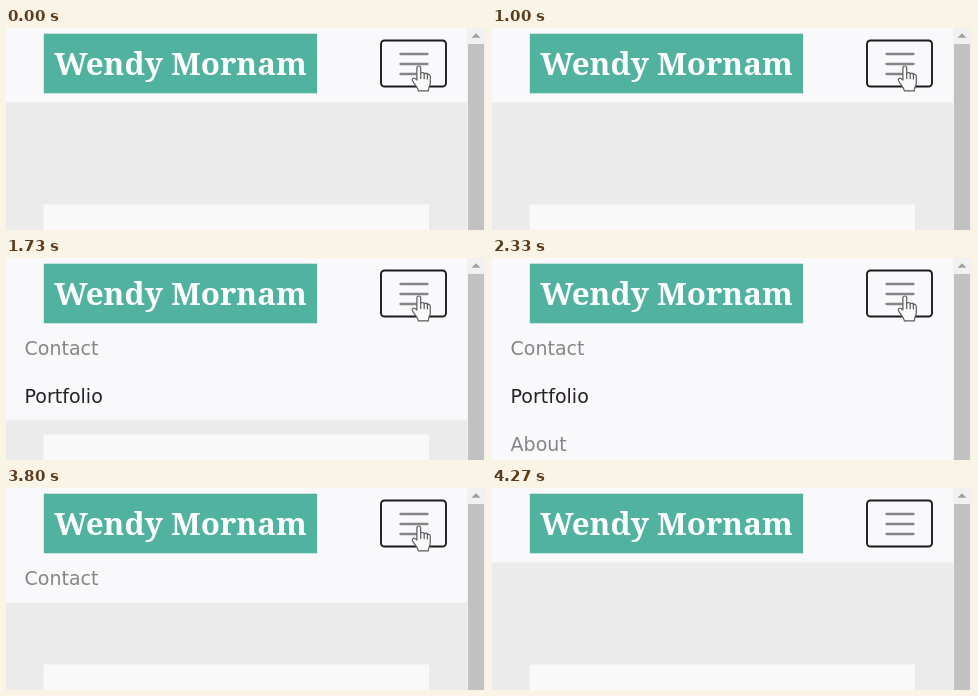
An HTML page that plays this animation: 480x202 px, repeating every 4.34 s.

```html
<!DOCTYPE html>
<html lang="en">
<head>
<meta charset="utf-8">
<title>Collapsing navbar</title>
<style>
  html, body { margin: 0; width: 100%; height: 100%; overflow: hidden; background: #ebebeb; }
  svg { display: block; width: 100vw; height: 100vh; }
  .brand { font: bold 31.3px "Noto Serif", serif; fill: #fbfdfd; text-anchor: middle; }
  .links { font: 19px "DejaVu Sans", sans-serif; fill: #86868a; }
  .links .active { fill: #252324; }
</style>
</head>
<body>
<svg viewBox="0 0 480 202" preserveAspectRatio="none">
  <defs>
    <clipPath id="menuClip"><rect id="menuArea" x="0" y="66" width="461" height="0"/></clipPath>
  </defs>

  <rect width="480" height="202" fill="#ebebeb"/>
  <rect x="37.5" y="176.5" width="385.5" height="26" fill="#f9f9fa"/>

  <rect id="bar" width="461" height="74.5" fill="#f9f9fb"/>
  <rect x="37.8" y="5.7" width="273.3" height="59.6" fill="#52b2a0"/>
  <text class="brand" x="174.5" y="47">Wendy Mornam</text>

  <g class="links" clip-path="url(#menuClip)">
    <text x="18.6" y="97">Contact</text>
    <text x="18.6" y="145" class="active">Portfolio</text>
    <text x="18.6" y="192.6">About</text>
  </g>

  <rect x="375" y="12.5" width="65" height="46" rx="3.5" fill="none" stroke="#1b1b20" stroke-width="1.9"/>
  <path d="M394.5 26H421.5M394.5 36H421.5M394.5 46H421.5" stroke="#858588" stroke-width="2.3" stroke-linecap="round"/>

  <!-- Scrollbar -->
  <rect x="461" width="19" height="202" fill="#f1f1f1"/>
  <rect x="462" y="16" width="16" height="186" fill="#c1c1c1"/>
  <path d="M465.5 9.8L470 5.2L474.5 9.8Z" fill="#a0a0a0"/>

  <!-- Hand pointer -->
  <g id="hand" transform="translate(1.6 .4)" stroke="#5c5c60" stroke-width="1.2" stroke-linejoin="round" stroke-linecap="round">
    <path fill="#fafafb" d="M409.3 51.5V39.6C409.3 36.9 413.1 36.9 413.1 39.6V45.2
      C413.6 43.6 416.4 43.8 416.6 45.6C417.4 44.4 419.6 44.7 419.8 46.4
      C420.8 45.5 422.7 46 422.7 48V54C422.7 57 421 58.2 420.7 62.5H410.8
      C410.5 59.4 407 56.4 404.9 52.3C404 50.2 406.2 49.1 407.6 50.2Z"/>
    <path fill="none" d="M413.1 45.2V50M416.6 45.6V50.3M419.8 46.4V50.6"/>
  </g>
</svg>

<script>
  const LOOP = 4340, FRAME = 1000 / 15;
  const OPEN_AT = 1610, CLOSE_AT = 3650, SLIDE = 350;
  const BAR = 74.5, MENU = 144;
  const HAND_GONE = 4190;
  const byId = id => document.getElementById(id);
  const bar = byId("bar"), menuArea = byId("menuArea"), hand = byId("hand");

  const bezier = (a, b, s) => 3 * a * s * (1 - s) ** 2 + 3 * b * s * s * (1 - s) + s ** 3;

  // CSS "ease": cubic-bezier(.25, .1, .25, 1)
  function ease(x) {
    if (x <= 0) return 0;
    if (x >= 1) return 1;
    let lo = 0, hi = 1;
    for (let i = 0; i < 24; i++) {
      const mid = (lo + hi) / 2;
      if (bezier(.25, .25, mid) < x) lo = mid; else hi = mid;
    }
    return bezier(.1, 1, lo);
  }

  function draw(time) {
    const t = Math.floor((time % LOOP + 5) / FRAME) * FRAME;
    const open = ease((t - OPEN_AT) / SLIDE) - ease((t - CLOSE_AT) / SLIDE);
    const height = MENU * open;
    bar.setAttribute("height", BAR + height);
    menuArea.setAttribute("height", height);
    hand.setAttribute("visibility", t < HAND_GONE ? "visible" : "hidden");
  }

  const start = performance.now();
  function tick() {
    draw(performance.now() - start);
    requestAnimationFrame(tick);
  }
  tick();
</script>
</body>
</html>
```
